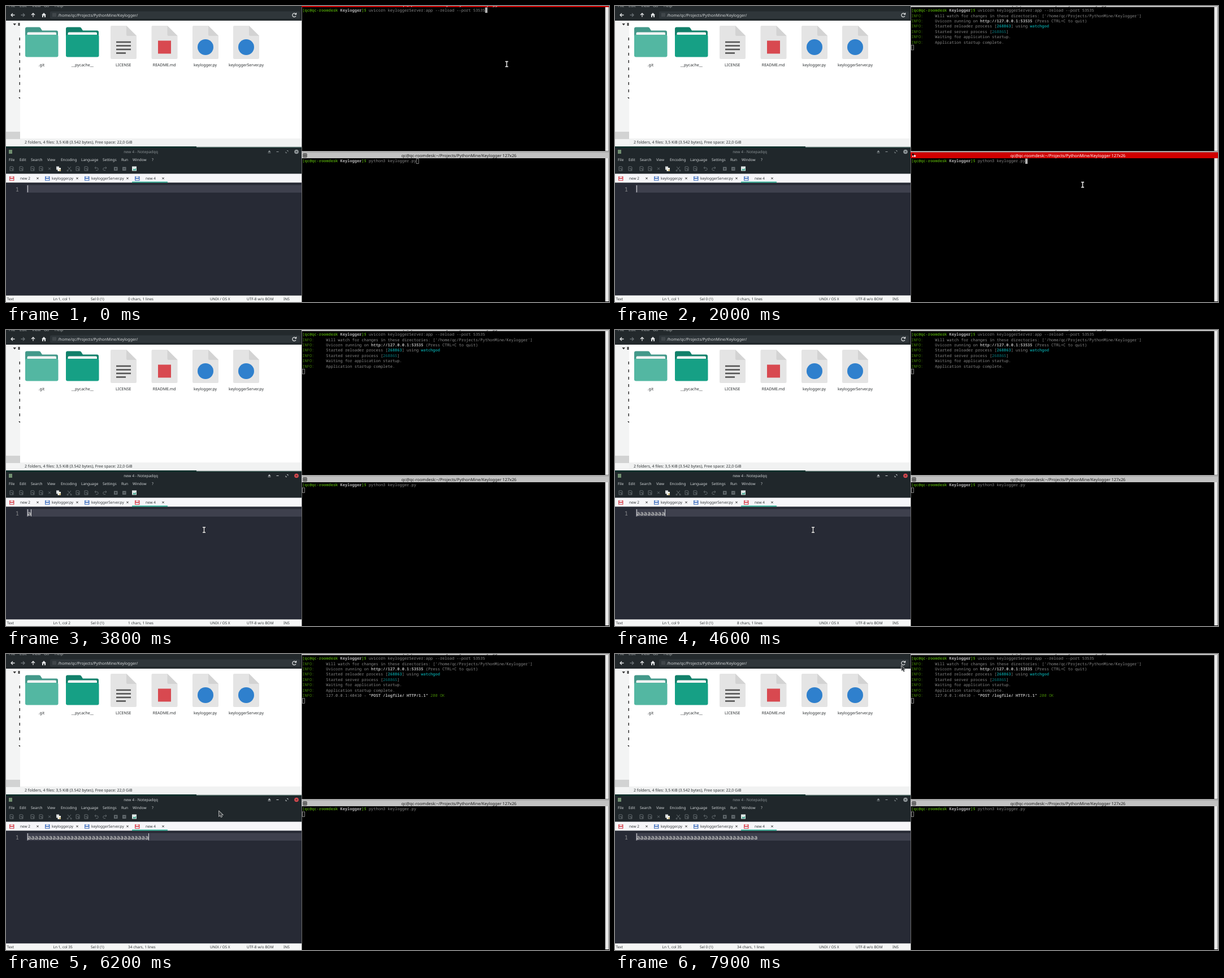
Recreate the animation shown at these times as an HTML page with a canvas. Size 1067 by 525 pixels, loop 8 s.

```html
<!DOCTYPE html>
<html lang="en">
<head>
<meta charset="utf-8">
<title>Desktop session</title>
<style>
html, body { margin: 0; width: 100%; height: 100%; overflow: hidden; background: #000; }
canvas { display: block; }
</style>
</head>
<body>
<canvas id="stage" width="1067" height="525"></canvas>
<script>
const ctx = document.getElementById('stage').getContext('2d');
ctx.textRendering = 'geometricPrecision';

const LOOP = 8000, STEP = 100;
const SANS = '"Noto Sans", sans-serif';
const MONO = '"Noto Sans Mono", monospace';
const COL = 4.2, ROW = 9.45, TERM_X = 524.3;
const SPLIT = 523;
const HOST = 'qc@qc-roomdesk';

// Drawing helpers
function rect(x, y, w, h, color) {
  ctx.fillStyle = color;
  ctx.fillRect(x, y, w, h);
}
function round(x, y, w, h, r, color) {
  ctx.fillStyle = color;
  ctx.beginPath();
  ctx.roundRect(x, y, w, h, r);
  ctx.fill();
}
function circle(x, y, r, color) {
  ctx.fillStyle = color;
  ctx.beginPath();
  ctx.arc(x, y, r, 0, 7);
  ctx.fill();
}
function shape(d, color, x = 0, y = 0, line = 0) {
  ctx.save();
  ctx.translate(x, y);
  const path = new Path2D(d);
  if (line) {
    ctx.strokeStyle = color;
    ctx.lineWidth = line;
    ctx.stroke(path);
  } else {
    ctx.fillStyle = color;
    ctx.fill(path);
  }
  ctx.restore();
}
function text(s, x, y, color, size = 6.5, align = 'left', family = SANS, weight = 400) {
  ctx.font = `${weight} ${size}px ${family}`;
  ctx.textAlign = align;
  ctx.fillStyle = color;
  ctx.fillText(s, x, y);
}

// File manager
function folder(x, front, back) {
  shape('M0 3Q0 0 3 0H24Q27 0 28 3L30 6H55Q58 6 58 9V30H0Z', back, x, 37.5);
  round(x + 3.5, 46.5, 51.5, 12, 2, '#f4f4f4');
  round(x, 51, 58.5, 39.5, 3, front);
}
function sheet(x) {
  shape('M2 0H28L46 18V57Q46 59 44 59H2Q0 59 0 57V2Q0 0 2 0Z', '#e4e4e4', x, 35);
  shape('M28 0L46 18H30Q28 18 28 16Z', '#d3d3d3', x, 35);
}
function fileManager() {
  rect(0, 0, SPLIT, 26, '#23292c');
  [['File', 5], ['Edit', 24], ['View', 46], ['Go', 67], ['Help', 86]]
    .forEach(([s, x]) => text(s, x, 2.2, '#aeb3b5', 7));
  round(78, 9.5, 442, 13, 2, '#2f363a');
  rect(82, 12.5, 7, 6.5, '#41474b');
  text('/home/qc/Projects/PythonMine/Keylogger/', 92, 18.5, '#d4d7d8', 7);
  const back = 'M3.5 0H-3M0 -3L-3 0L0 3';
  shape(back, '#e2e4e5', 12, 16, 1.3);
  ctx.save();
  ctx.translate(30, 16);
  ctx.scale(-1, 1);
  shape(back, '#697074', 0, 0, 1.3);
  ctx.restore();
  shape('M0 3.5V-3M-3 0L0 -3L3 0', '#e2e4e5', 48, 16, 1.3);
  shape('M0 -4L4 0H3V4H1V1H-1V4H-3V0H-4Z', '#e2e4e5', 67, 16);
  shape('M3 -1.5A3.3 3.3 0 1 0 3 1.8M3.6 -4V-1H.6', '#e2e4e5', 510, 16, 1.2);

  rect(0, 26, 25, 223, '#f3f4f4');
  rect(0, 223, 25, 13, '#d2d3d3');
  rect(25, 26, SPLIT - 25, 209, '#fff');
  rect(25, 235, SPLIT - 25, 14, '#f1f2f2');
  shape('M12.5 31H18L15.2 34.5Z', '#333');
  rect(21.5, 30, 3, 5, '#444');
  [58, 72, 85, 98, 111, 124, 137, 150].forEach(y => rect(23.5, y - 2, 1.5, 5, '#333'));
  shape('M22 162H25V165Z', '#333');

  folder(34, '#53b7a2', '#43998a');
  folder(106, '#16a085', '#11806a');
  [185, 257.5, 330, 402].forEach(sheet);
  [64, 70.5, 77, 83.5].forEach((y, i) => rect(195, y - 1.3, i < 3 ? 26 : 17, 2.6, '#555'));
  rect(269, 61.5, 23, 23, '#d84950');
  circle(353, 73, 14, '#2f80cd');
  circle(425, 73, 14, '#2f80cd');
  ['.git', '__pycache__', 'LICENSE', 'README.md', 'keylogger.py', 'keyloggerServer.py']
    .forEach((s, i) => text(s, 63 + i * 72.4, 106.5, '#2b2f31', 7, 'center'));
  text('2 folders, 4 files: 3,5 KiB (3.542 bytes), Free space: 22,0 GiB', 33, 244, '#2c3133', 7);
}

// Text editor
function floppy(x, color) {
  round(x - 4, 302, 8.5, 8, 1, color);
  rect(x - 2.3, 302.5, 5, 2.3, '#f5f5f7');
  rect(x - 2.8, 306.5, 6, 2.6, '#e6e8ee');
}
function toolbar() {
  const dim = '#626a6e';
  [10, 27, 47, 62, 127, 142].forEach(x => shape('M-3 -3.5H2L3 -2.5V3.5H-3ZM-1.5 0H1.5V3', dim, x, 288.5, 1));
  shape('M-2 -2L2 2M2 -2L-2 2', dim, 77, 288.5, 1);
  rect(89, 284.5, 5, 6, '#d5d9da');
  rect(91.5, 287, 5.5, 6, '#f2f2ec');
  rect(94, 290, 3, 2.5, '#c9b26a');
  shape('M-3 -3.5L2 2M3 -3.5L-2 2M-3 2.5A1 1 0 1 0 -2.9 2.5M3 2.5A1 1 0 1 0 3.1 2.5', dim, 112, 288.5, 1);
  shape('M-3 -1.5H1A2 2 0 0 1 1 3H-1M-1 -3.5L-3 -1.5L-1 .5', dim, 160, 288.5, 1);
  shape('M3 -1.5H-1A2 2 0 0 0 -1 3H1M1 -3.5L3 -1.5L1 .5', dim, 175, 288.5, 1);
  [194, 209].forEach(x => {
    rect(x - 3, 285.5, 6.5, 6.5, dim);
    rect(x - 1.5, 288.3, 3.5, 1, '#20272b');
  });
  rect(193.7, 287, 1, 3.5, '#20272b');
  rect(223, 284.5, 8, 8, '#dfe8e6');
  shape('M-3 3L-1 0L1 1.5L3 -1.5V3Z', '#3aa48d', 227, 288.5);
}
function editor(t) {
  const focused = t >= 3300 && t < 7300;
  const count = t < 3800 ? 0 : t < 4300 ? 1 : Math.min(34, 2 * Math.floor((t - 4300) / 100) + 2);
  const caretOn = focused && !(t >= 6400 && t < 6900);

  rect(0, 249, SPLIT, 3, '#12302c');
  rect(337, 249, SPLIT - 337, 1.5, '#c4c9c9');
  rect(0, 252, SPLIT, 46, '#20272b');
  rect(5, 255, 6, 7, '#718f70');
  text('new 4 - Notepadqq', 238.5, 261, focused ? '#c9cdcf' : '#8b9295', 6.8, 'center');
  const button = focused ? '#c9cdcf' : '#929a9d';
  shape('M-2.5 .5L0 -2.5L2.5 .5ZM-2.5 1.5H2.5V2.3H-2.5Z', button, 466, 258.5);
  rect(478.5, 258, 4, 1, button);
  shape('M0 -2H2V0M0 2H-2V0', button, 497, 258.5, .9);
  circle(514, 258.5, 3.8, focused ? '#db4a50' : '#92999c');
  shape('M-1.4 -1.4L1.4 1.4M1.4 -1.4L-1.4 1.4', '#22282b', 514, 258.5, .9);
  [['File', 5], ['Edit', 24], ['Search', 44], ['View', 73], ['Encoding', 97], ['Language', 133],
   ['Settings', 171], ['Run', 204], ['Window', 224], ['?', 258]]
    .forEach(([s, x]) => text(s, x, 275, '#d2d6d8'));
  toolbar();

  rect(0, 297.5, SPLIT, 16, '#f6f6f9');
  rect(223, 311.5, 63, 2, '#2eb398');
  const red = '#da4650', blue = '#4a78c4';
  [['new 2', 25, 10, 56, red], ['keylogger.py', 81, 73, 126, blue],
   ['keyloggerServer.py', 151, 143, 215, blue], ['new 4', 247, 232, 278, count ? red : blue]]
    .forEach(([s, x, icon, close, color]) => {
      floppy(icon, color);
      text(s, x, 308, '#2f3336');
      shape('M-1.6 -1.6L1.6 1.6M1.6 -1.6L-1.6 1.6', '#333', close, 305.7, 1);
    });

  rect(0, 313.5, SPLIT, 200, '#272a35');
  rect(36, 317.5, SPLIT - 36, 13.5, '#3e404d');
  text('1', 20, 328.5, '#8d8f91', 10.5, 'center', MONO);
  text('a'.repeat(count), 38, 328.5, '#e9e9e4', 10.5, 'left', MONO);
  rect(38, 318, 1, 12.5, '#dedfe2');
  if (caretOn) rect(38 + Math.round(count * 6.3), 318, 1, 12.5, '#dedfe2');

  rect(0, 513.5, SPLIT, 11.5, '#f5f6f6');
  [['Text', 1.5], [`Ln 1, col ${count + 1}`, 83.5], ['Sel 0 (1)', 150], [`${count} chars, 1 lines`, 216],
   ['UNIX / OS X', 361], ['UTF-8 w/o BOM', 426], ['INS', 491]]
    .forEach(([s, x]) => text(s, x, 522, '#2e3234'));
}

// Terminals: each line is a list of [style, text] runs, upper case means bold
const TONES = { g: '#418205', w: '#8a8a8a', c: '#067a7e', G: '#479007', W: '#b4b4b4', C: '#06898b' };
const prompt = cmd => [['G', `[${HOST}`], ['W', ' Keylogger'], ['G', ']$ '], ['w', cmd]];
const info = (...runs) => [['g', 'INFO:'], ['w', '     '], ...runs];
const LOG = [
  [0, prompt('uvicorn keyloggerServer:app --reload --port 53535')],
  [1000, info(['w', "Will watch for changes in these directories: ['/home/qc/Projects/PythonMine/Keylogger']"])],
  [1000, info(['w', 'Uvicorn running on '], ['W', 'http://127.0.0.1:53535'], ['w', ' (Press CTRL+C to quit)'])],
  [1000, info(['w', 'Started reloader process ['], ['C', '268863'], ['w', '] using '], ['C', 'watchgod'])],
  [1300, info(['w', 'Started server process ['], ['c', '268865'], ['w', ']'])],
  [1300, info(['w', 'Waiting for application startup.'])],
  [1300, info(['w', 'Application startup complete.'])],
  [6000, info(['w', '127.0.0.1:40410 - '], ['W', '"POST /logfile/ HTTP/1.1"'], ['g', ' 200 OK'])]
];
function termLine(runs, y) {
  let col = 0;
  for (const [style, s] of runs) {
    const bold = style < 'a';
    text(s, TERM_X + col * COL, y, TONES[style], 7, 'left', MONO, bold ? 700 : 400);
    col += s.length;
  }
}
function termCursor(col, top, filled) {
  const x = TERM_X + col * COL;
  if (filled) return rect(x, top, COL, ROW, '#b4b4b4');
  ctx.strokeStyle = '#a0a0a0';
  ctx.lineWidth = .8;
  ctx.strokeRect(x + .2, top + .4, COL - .2, ROW - .8);
}
function termTitle(top, active) {
  rect(SPLIT, top, 1067 - SPLIT, 10.5, active ? '#cf0000' : '#c2c2c2');
  text(`${HOST}:~/Projects/PythonMine/Keylogger 127x26`, 801.5, top + 8, active ? '#fff' : '#1c1c1c', 7.3, 'center');
}
function scrollbar(y, h) {
  rect(1060, y, 7, h, '#8f8f8f');
  rect(1061, y, 5, h, '#e8e8e8');
}
function terminals(t) {
  const topActive = t < 1900, lowActive = t >= 1900 && t < 3300;
  rect(SPLIT, 0, 1067 - SPLIT, 525, '#000');
  rect(SPLIT, 0, 1, 525, '#6d6d6d');

  termTitle(-8.5, topActive);
  scrollbar(2, 255);
  const lines = LOG.filter(([at]) => t >= at);
  lines.forEach(([, runs], i) => termLine(runs, 10.1 + i * ROW));
  const entered = t >= 800;
  if (!topActive || t < 200 || t >= 700)
    termCursor(entered ? 0 : 77, 2.7 + (entered ? lines.length : 0) * ROW, topActive);

  rect(SPLIT, 257.5, 1067 - SPLIT, 2, '#dadada');
  termTitle(259.5, lowActive);
  if (lowActive) {
    rect(526, 262, 3, 3, '#111');
    rect(529, 264.5, 3, 3, '#fff');
    rect(526, 265.5, 2, 2, '#fff');
  } else {
    shape('M-3 -3H3V3H-3ZM-3 0H3M0 -3V3', '#222', 529, 265, 1);
  }
  scrollbar(270, 254);
  termLine(prompt('python3 keylogger.py'), 277.3);
  const started = t >= 2500;
  if (!lowActive || t < 3000) termCursor(started ? 0 : 48, started ? 279.5 : 270.5, lowActive);
}

// Mouse pointer
const PATH = [
  [800, 886, 103], [1500, 835, 291], [1700, 827.5, 317], [2100, 827.5, 317], [2200, 827.5, 316.5],
  [2600, 827.5, 316.5], [3200, 350.5, 354.5], [6000, 350.5, 354.5], [6600, 452, 62], [7000, 469, 122],
  [7300, 469, 122], [7800, 510, 33], [7900, 507, 21]
];
function pointerAt(t) {
  const i = PATH.findIndex(p => p[0] > t);
  if (i < 0) return PATH.at(-1).slice(1);
  if (!i) return PATH[0].slice(1);
  const [t0, x0, y0] = PATH[i - 1], [t1, x1, y1] = PATH[i];
  const u = (t - t0) / (t1 - t0), k = u * u * (3 - 2 * u);
  return [x0 + (x1 - x0) * k, y0 + (y1 - y0) * k];
}
function pointer(t) {
  if (t >= 2500 && t < 2700) return;
  const [x, y] = pointerAt(t);
  const overText = x >= SPLIT ? y < 257 || y > 270 : y >= 314 && y < 514;
  if (overText) {
    const beam = 'M-2.5 -4.5H2.5M0 -4.5V4.5M-2.5 4.5H2.5';
    shape(beam, '#222', x, y, 2.2);
    shape(beam, '#eee', x, y, 1.3);
  } else {
    const arrow = 'M0 0V9L2.2 7.2L3.8 10.5L5.4 9.7L3.9 6.6H6.8Z';
    shape(arrow, '#e8e8e8', x, y, 1.2);
    shape(arrow, '#3c4043', x, y);
  }
}

function draw(now) {
  const t = Math.floor((now % LOOP) / STEP) * STEP;
  fileManager();
  editor(t);
  terminals(t);
  pointer(t);
  requestAnimationFrame(draw);
}
requestAnimationFrame(draw);
</script>
</body>
</html>
```
